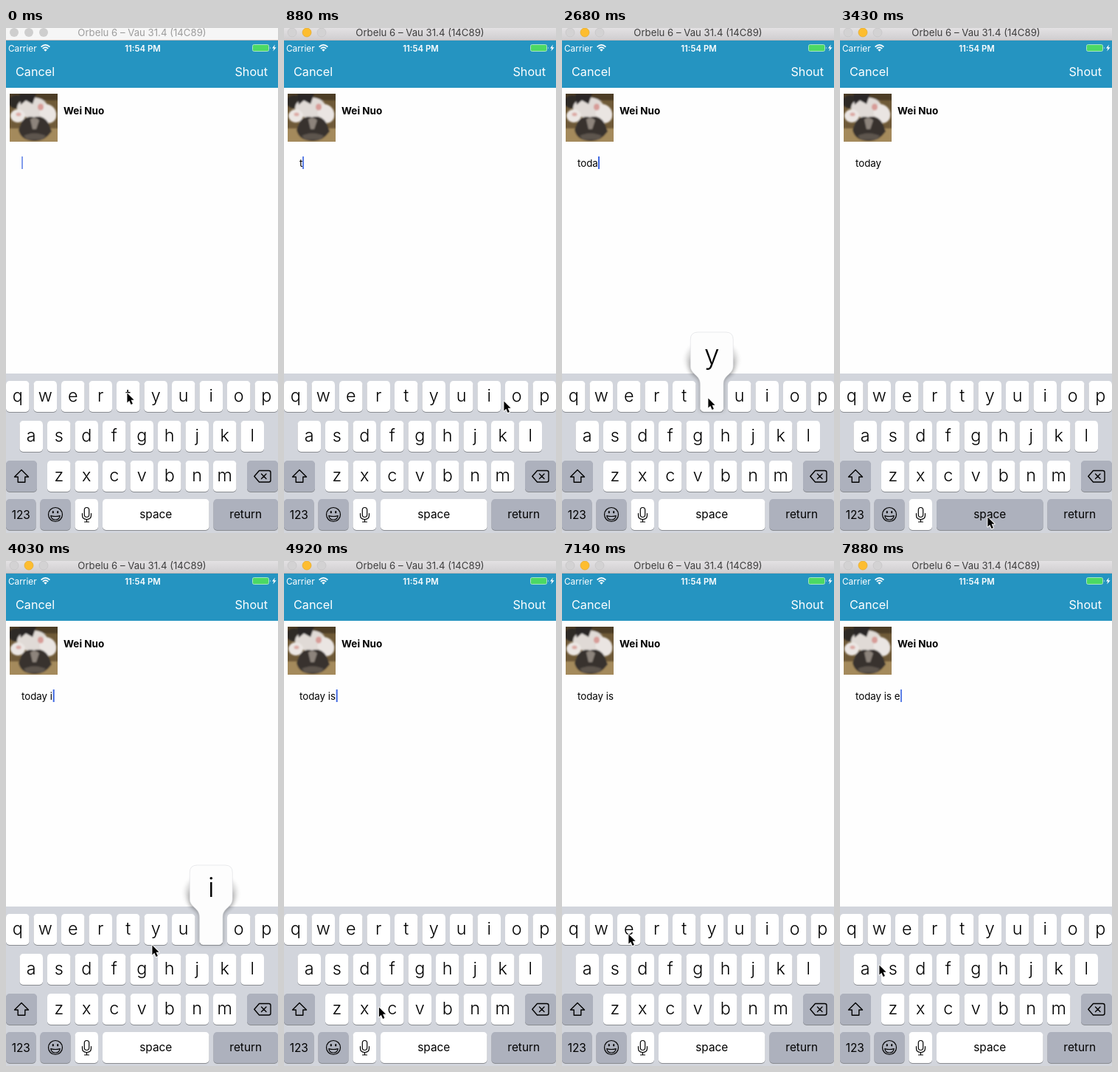
These frames come from a looping animation (369x684 px, 8000 ms). An HTML page:

```html
<!DOCTYPE html>
<html lang="en">
<head>
<meta charset="utf-8">
<title>Compose</title>
<style>
html, body { margin: 0; width: 100%; height: 100%; overflow: hidden; background: #fefefe; }
svg { display: block; }
text { font-family: Inter, Roboto, sans-serif; }
.mid { text-anchor: middle; }
.bar { fill: #f6f6f6; }
.lamp { fill: #cecece; }
.title { font-size: 13.2px; fill: #9c9c9c; }
.active .bar { fill: url(#barGrad); }
.active .lamp { fill: #d3d2d3; stroke: #c4c3c4; stroke-width: .7; }
.active .lamp.on { fill: #fdbd2f; stroke: #e3a82c; }
.active .title { fill: #3d3d3d; }
.nav { font-size: 16.2px; fill: #fff; }
.status { font-size: 11.8px; fill: #fff; }
.key { fill: #fff; }
.dark, .key.down { fill: #adb1bd; }
.edge { fill: #898c91; }
.letter { font-size: 23.4px; font-weight: 350; }
.word { font-size: 15.4px; }
.line { fill: none; stroke: #000; stroke-width: 1.4; stroke-linecap: round; stroke-linejoin: round; }
.big { font-size: 37px; font-weight: 300; }
</style>
</head>
<body>
<svg id="stage" width="369" height="684" viewBox="0 0 369 684">
  <defs>
    <linearGradient id="barGrad" x2="0" y2="1">
      <stop stop-color="#e3e1e3"/><stop offset="1" stop-color="#d0ced0"/>
    </linearGradient>
    <filter id="soft" x="-20%" y="-20%" width="140%" height="140%"><feGaussianBlur stdDeviation="1"/></filter>
    <filter id="shade" x="-30%" y="-30%" width="160%" height="160%"><feGaussianBlur stdDeviation="3"/></filter>
    <clipPath id="photo"><rect x="5" y="89" width="65" height="65"/></clipPath>
  </defs>

  <rect width="369" height="684" fill="#fefefe"/>

  <!-- window bar -->
  <g id="win">
    <rect class="bar" width="369" height="16"/>
    <rect y="16" width="369" height="1" fill="#b9b7b8"/>
    <circle class="lamp" cx="11" cy="6" r="6"/>
    <circle class="lamp on" cx="31" cy="6" r="6"/>
    <circle class="lamp" cx="51" cy="6" r="6"/>
    <text class="title mid" x="184.5" y="11">Orbelu 6 – Vau 31.4 (14C89)</text>
  </g>

  <!-- app header -->
  <rect y="17" width="369" height="64" fill="#2594c1"/>
  <text class="status" x="3" y="31.5">Carrier</text>
  <g fill="none" stroke="#fff" stroke-width="1.7">
    <path d="M47.6 25.6Q53.5 20 59.4 25.6M49.8 28Q53.5 24.4 57.2 28"/>
  </g>
  <path d="M51.3 29.4Q53.5 27.4 55.7 29.4L53.5 31.8Z" fill="#fff"/>
  <text class="status mid" x="185.5" y="31.5" font-weight="600" style="font-size:11.4px">11:54 PM</text>
  <rect x="334.5" y="22.5" width="22" height="9" rx="2" fill="#4cd964" stroke="#a7e5c4"/>
  <path d="M358 25.5q1.6 1.5 0 3Z" fill="#d6eef5"/>
  <path d="M364.8 22.5L361 27.6H363.4L362.2 31.6L366.6 26.2H364Z" fill="#fff"/>
  <text class="nav" x="13" y="65">Cancel</text>
  <text class="nav" x="355" y="65" text-anchor="end">Shout</text>

  <!-- profile -->
  <g clip-path="url(#photo)">
    <rect x="5" y="89" width="65" height="65" fill="#6f5a38"/>
    <g filter="url(#soft)">
      <rect x="0" y="84" width="75" height="14" fill="#4d3d25"/>
      <rect x="0" y="136" width="75" height="22" fill="#a48a5c"/>
      <ellipse cx="14" cy="100" rx="11" ry="9" fill="#2f2a28"/>
      <ellipse cx="36" cy="108" rx="21" ry="14" fill="#e0dad6"/>
      <path d="M18 89H41L36 103L27 98L20 104Z" fill="#2b2828"/>
      <ellipse cx="57" cy="116" rx="11" ry="13" transform="rotate(-25 57 116)" fill="#eae5e2"/>
      <ellipse cx="16" cy="119" rx="10" ry="9" fill="#ebe6e3"/>
      <path d="M22 126Q29 118 38 121Q50 117 57 128L62 140Q52 154 38 153Q20 152 17 138Z" fill="#37322f"/>
      <path d="M33 124Q39 119 45 125L41 137H36Z" fill="#8d847c"/>
      <path d="M24 146Q38 139 54 146L50 151H28Z" fill="#5d554d"/>
      <ellipse cx="47" cy="107" rx="4" ry="4.5" fill="#d79c97"/>
      <ellipse cx="17" cy="117" rx="3.5" ry="2.5" fill="#dcaaa4"/>
    </g>
  </g>
  <text x="78" y="117" font-size="13.5" font-weight="700">Wei Nuo</text>

  <text id="note" x="21" y="187.5" font-size="13.3" xml:space="preserve"></text>
  <rect id="caret" y="174" width="2" height="17" fill="#4069e2"/>

  <!-- keyboard -->
  <rect y="468" width="369" height="216" fill="#d2d5dc"/>
  <g id="keys"></g>
  <g class="line">
    <path d="M21 598.5L30.5 608H25.8V615.3H16.2V608H11.5Z"/>
    <path d="M343.5 599.5H356.5Q359 599.5 359 602V612.5Q359 615 356.5 615H343.5L336.8 607.2ZM346.5 604L353 610.5M353 604L346.5 610.5"/>
    <circle cx="67" cy="659" r="9.5" stroke-width="1.2"/>
    <path d="M60.8 660.6Q67 662.4 73.2 660.6Q72.4 666.2 67 666.2T60.8 660.6Z" stroke-width="1.1"/>
    <rect x="106.3" y="649.5" width="6.4" height="13" rx="3.2" stroke-width="1.2"/>
    <path d="M103.5 657.5V660Q103.5 665.5 109.5 665.5T115.5 660V657.5M109.5 665.5V669M106.5 669H112.5" stroke-width="1.2"/>
  </g>
  <ellipse cx="63.8" cy="655.8" rx="1.1" ry="1.7"/>
  <ellipse cx="70.2" cy="655.8" rx="1.1" ry="1.7"/>

  <g id="popup">
    <ellipse cy="-28" rx="35" ry="27" opacity=".16" filter="url(#shade)"/>
    <path d="M-29-30V-18C-29-6-16-8-16 5V40H16V5C16-8 29-6 29-18V-30Z" opacity=".3" filter="url(#shade)"/>
    <path fill="#fdfdfd" stroke="#d3d5d9" stroke-width=".5"
      d="M-19-66H19Q29-66 29-56V-20C29-9 15.8-8 15.8 4V37Q15.8 42 11 42H-11Q-15.8 42-15.8 37V4C-15.8-8-29-9-29-20V-56Q-29-66-19-66Z"/>
    <path d="M-15.3 39Q-15 42.5-11 42.5H11Q15 42.5 15.3 39" fill="none" stroke="#898c91"/>
    <text id="big" class="big mid" y="-23"></text>
  </g>

  <path id="pointer" d="M.4 .6V13.4L3.3 10.7L5.6 16L7.9 15L5.6 9.8H9.6Z" stroke="#fff" stroke-width="2" stroke-linejoin="round" paint-order="stroke"/>
</svg>

<script>
const LOOP = 8000, STEP = 148.9;   // the screen refreshes in steps of STEP ms
const $ = id => document.getElementById(id);
const keys = {};

function add(tag, attrs, text = '') {
  const el = document.createElementNS('http://www.w3.org/2000/svg', tag);
  for (const k in attrs) el.setAttribute(k, attrs[k]);
  el.textContent = text;
  return $('keys').appendChild(el);
}

function addKey(x, y, width, cls, label, labelCls, base) {
  const box = { x, width, height: 42, rx: 4.8 };
  add('rect', { ...box, y: y + 1, class: 'edge' });
  const el = add('rect', { ...box, y, class: cls });
  if (label) add('text', { x: x + width / 2, y: y + base, class: labelCls + ' mid' }, label);
  return { el, cx: x + width / 2, y };
}

[['qwertyuiop', 0, 478], ['asdfghjkl', 18.5, 532], ['zxcvbnm', 56, 586]].forEach(([row, x, y]) =>
  [...row].forEach((c, i) => keys[c] = addKey(x + i * 37.5, y, 31.5, 'key', c, 'letter', 27.5)));
addKey(0, 586, 42, 'dark');
addKey(327, 586, 42, 'dark');
addKey(0, 638, 40.5, 'dark', '123', 'word', 27);
addKey(46.5, 638, 41, 'dark');
addKey(93.5, 638, 31.5, 'key');
keys[' '] = addKey(131, 638, 144.5, 'key', 'space', 'word', 26);
addKey(281.5, 638, 87.5, 'dark', 'return', 'word', 26);

// key, step pressed, step released, caret x after it
const taps = [
  ['t', 1, 3, 25], ['o', 8, 9, 33.3], ['d', 11, 12, 41.5], ['a', 15, 16, 49], ['y', 18, 19, 56.5],
  [' ', 23, 24, 60], ['i', 26, 27, 63.7], ['s', 31, 32, 70.7], [' ', 35, 36, 74], ['e', 49, 50, 82]
];

// pointer path: step, x, y
const path = [
  [0, 164, 494], [3, 164, 494], [5, 265, 520], [6, 298, 505], [7, 312, 503], [9, 312, 503],
  [10, 225, 520], [11, 110, 549], [12, 110, 549], [14, 38, 555], [16, 38, 555], [18, 198, 501],
  [19, 198, 501], [21, 200, 635], [22, 200, 662], [24, 200, 662], [26, 276, 505], [27, 198, 520],
  [29, 72, 552], [32, 72, 552], [34, 185, 656], [36, 185, 656], [37, 182, 556], [45, 182, 556],
  [48, 90, 505], [50, 90, 505], [52, 56, 544], [53, 53, 547]
];

function pointerAt(n) {
  const i = Math.max(1, path.findIndex(p => p[0] >= n));
  const [a, x0, y0] = path[i - 1], [b, x1, y1] = path[i];
  const k = (n - a) / (b - a);
  return [x0 + (x1 - x0) * k, y0 + (y1 - y0) * k];
}

// solid after typing, then a soft blink of seven steps
function caretAlpha(age) {
  return [1, 1, 1, .85, 0, 0, .5][age % 7];
}

function draw(n) {
  $('win').setAttribute('class', n > 0 ? 'active' : '');

  const typed = taps.filter(t => n >= t[2]);
  const last = typed[typed.length - 1];
  $('note').textContent = typed.map(t => t[0]).join('');
  $('caret').setAttribute('x', last ? last[3] : 21);
  $('caret').setAttribute('opacity', last ? caretAlpha(n - last[2]) : n ? 0 : .65);

  const held = taps.find(t => n >= t[1] && n <= t[2]);
  const c = held && held[0];
  keys[' '].el.setAttribute('class', c === ' ' && n < held[2] ? 'key down' : 'key');
  const pop = c && c !== ' ';
  $('popup').style.display = pop ? '' : 'none';
  if (pop) {
    $('popup').setAttribute('transform', `translate(${keys[c].cx} ${keys[c].y})`);
    $('big').textContent = c;
  }

  $('pointer').setAttribute('transform', `translate(${pointerAt(n)})`);
}

function tick() {
  const t = performance.now() % LOOP;
  draw(Math.min(53, Math.floor((t + 16) / STEP)));
  requestAnimationFrame(tick);
}
tick();
</script>
</body>
</html>
```
